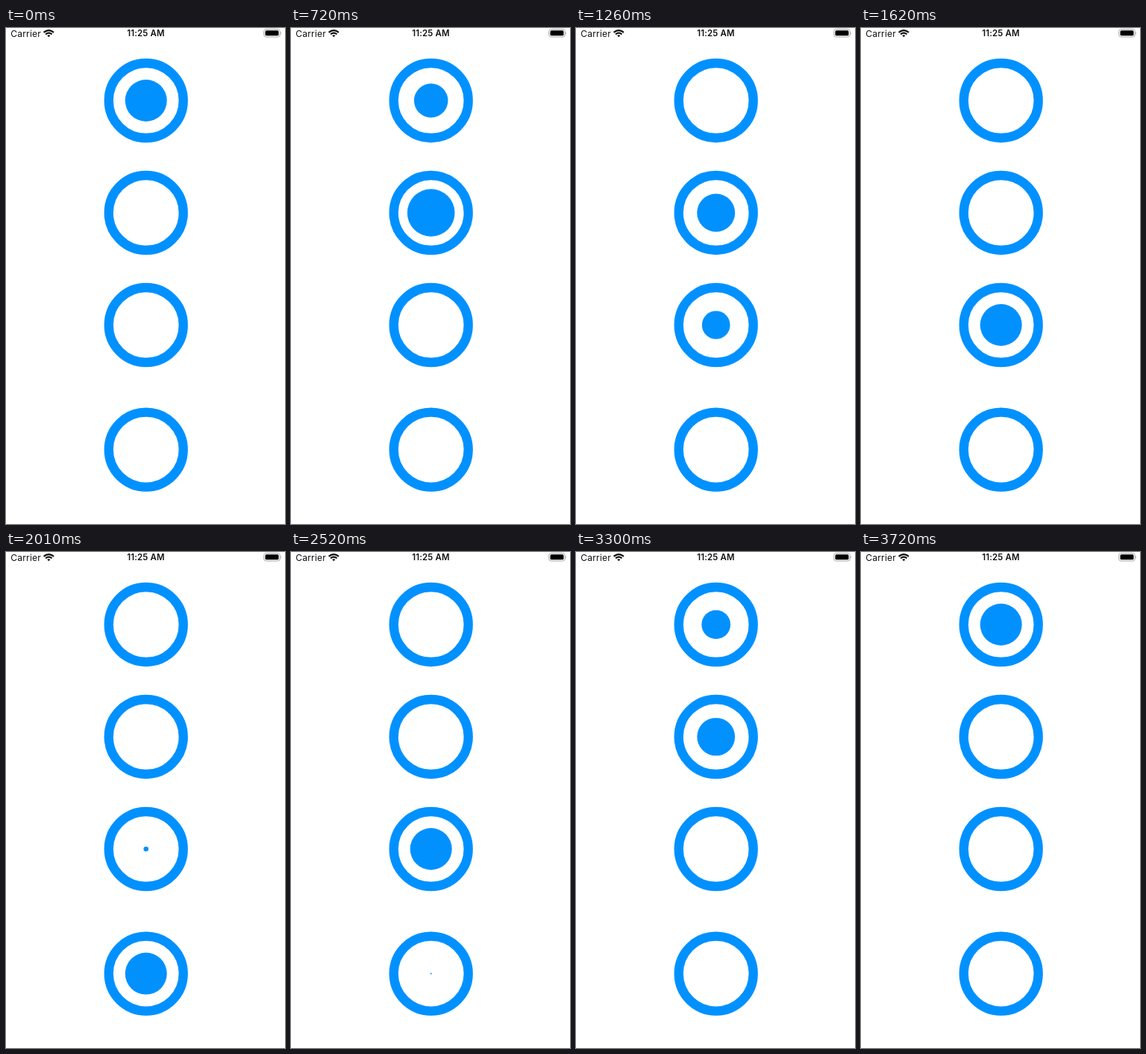
Animation of 374 by 663 pixels, one loop 3810 ms. Source, as an HTML page:

```html
<!DOCTYPE html>
<html lang="en">
<head>
<meta charset="utf-8">
<title>Radio buttons</title>
<style>
  html, body { margin: 0; width: 100%; height: 100%; overflow: hidden; background: #fff; }
  svg { display: block; width: 374px; height: 663px; }
  text { font-family: Inter, Roboto, sans-serif; letter-spacing: .2px; fill: #111; }
</style>
</head>
<body>
<svg viewBox="0 0 374 663">
  <text x="6.3" y="11.6" font-size="12" fill="#333">Carrier</text>
  <text x="187.5" y="11.4" font-size="11.4" font-weight="600" text-anchor="middle">11:25 AM</text>
  <g fill="none" stroke="#111" stroke-width="2.1">
    <path d="M50.6 5.9Q57.3 .3 64 5.9M53.1 8.4Q57.3 5 61.5 8.4"/>
    <path d="M55.2 10L57.3 12.3L59.4 10Q57.3 8.6 55.2 10Z" fill="#111" stroke="none"/>
  </g>
  <rect x="345.7" y="1.6" width="21.6" height="10.4" rx="3" fill="none" stroke="#aaa"/>
  <rect x="347.5" y="3.3" width="18" height="7" rx="1.6" fill="#000"/>
  <path d="M368.3 5.2Q370.2 6.8 368.3 8.4Z" fill="#aaa"/>
  <g id="radios"></g>
</svg>
<script>
const LOOP = 3810, BLUE = '#0091ff', CENTER_X = 187.7, DOT = 28;
const GROW = 115, SETTLE = 100, SHRINK = 300, OVERSHOOT = 1.4;
const rows = [97, 247, 397, 563.6];
// [tap time, selected row]
const taps = [[638, 1], [1205, 2], [1775, 3], [2255, 2], [2750, 1], [3244, 0]];

const group = document.getElementById('radios');

function addCircle(y, attrs) {
  const el = document.createElementNS('http://www.w3.org/2000/svg', 'circle');
  Object.entries({ cx: CENTER_X, cy: y, ...attrs }).forEach(([k, v]) => el.setAttribute(k, v));
  return group.appendChild(el);
}

const dots = rows.map(y => {
  addCircle(y, { r: 50, fill: 'none', stroke: BLUE, 'stroke-width': 12.3 });
  return addCircle(y, { r: 0, fill: BLUE });
});

const ease = x => {
  x = Math.min(1, Math.max(0, x));
  return x * x * (3 - 2 * x);
};
const appear = t => t < GROW
  ? OVERSHOOT * ease(t / GROW)
  : OVERSHOOT + (1 - OVERSHOOT) * ease((t - GROW) / SETTLE);
const vanish = t => 1 - ease(t / SHRINK);

function draw(time) {
  const scale = [1, 0, 0, 0];
  let selected = 0;
  for (const [start, row] of taps) {
    if (time < start) break;
    scale[selected] = vanish(time - start);
    scale[row] = appear(time - start);
    selected = row;
  }
  dots.forEach((dot, i) => dot.setAttribute('r', DOT * scale[i]));
}

const begin = performance.now();
function tick() {
  draw((performance.now() - begin) % LOOP);
  requestAnimationFrame(tick);
}
tick();
</script>
</body>
</html>
```
